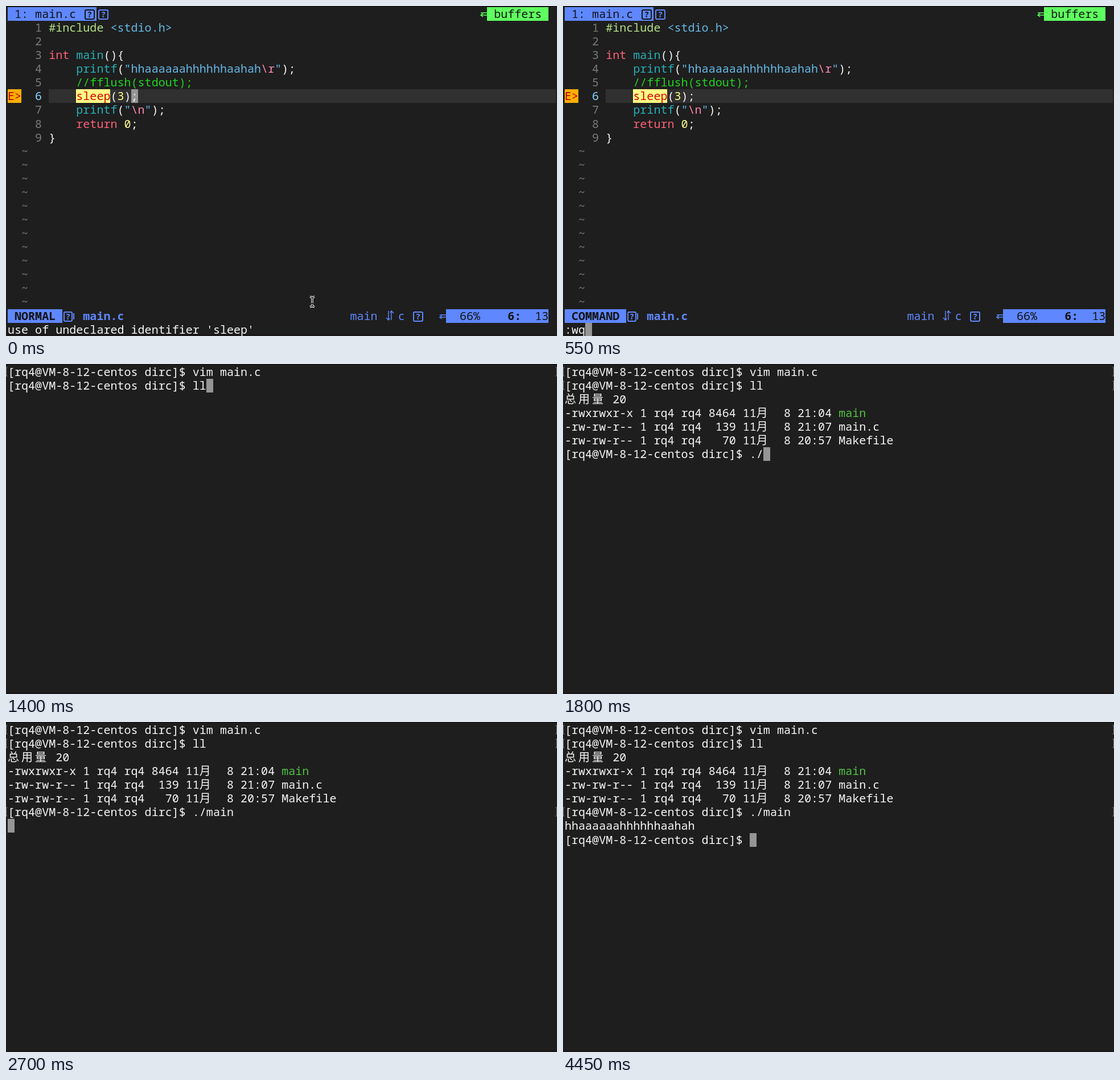
Write an HTML page with a canvas that moves like this. It is 968 px wide and 579 px high and loops after 4.5 s.

```html
<!DOCTYPE html>
<html lang="zh">
<head>
<meta charset="utf-8">
<title>Terminal session</title>
<style>
html, body { margin: 0; width: 100%; height: 100%; overflow: hidden; background: #1e1e1e; }
canvas { display: block; }
</style>
</head>
<body>
<canvas id="stage" width="968" height="579"></canvas>
<script>
const ctx = document.getElementById('stage').getContext('2d');
const LOOP = 4500, CELL = 12.03, ROW = 24.07, LEFT = 3, TOP = 2;
const FONT = '20.05px "Noto Sans Mono", "Noto Sans CJK SC", "Noto Sans CJK", monospace';
const C = {
  bg: '#1e1e1e', white: '#f6f6f6', blue: '#5f87ff', lime: '#5fff5f', ink: '#141414',
  grey: '#7a7a7a', cursor: '#959595', line: '#303030', red: '#ff6079', teal: '#27afb6',
  sky: '#65b9e6', pink: '#ff87af', comment: '#1fd41f', yellow: '#ffff87', include: '#b4e283',
  exec: '#53c245'
};
const PROMPT = '[rq4@VM-8-12-centos dirc]$ ';

const colX = col => LEFT + col * CELL;
const rowY = row => TOP + row * ROW;

function fill(x, y, w, h, color) {
  ctx.fillStyle = color;
  ctx.fillRect(x, y, w, h);
}

function block(col, row, cells, color) {
  const x = Math.round(colX(col)), y = Math.round(rowY(row));
  fill(x, y, Math.round(colX(col + cells)) - x, 24, color);
}

// Places characters on the terminal grid; CJK characters take two cells.
function put(col, row, text, color = C.white, weight = '') {
  ctx.font = weight + ' ' + FONT;
  ctx.fillStyle = color;
  for (const ch of text) {
    ctx.fillText(ch, colX(col), rowY(row) + 19);
    col += ch > '\u2fff' ? 2 : 1;
  }
  return col;
}

function putRuns(col, row, runs) {
  for (const [text, color] of runs) col = put(col, row, text, color);
}

function stroke(color, width, ...paths) {
  ctx.strokeStyle = color;
  ctx.lineWidth = width;
  ctx.beginPath();
  for (const [start, ...rest] of paths) {
    ctx.moveTo(...start);
    for (const p of rest) ctx.lineTo(...p);
  }
  ctx.stroke();
}

function missingGlyph(x, row, color, w = 17) {
  const y = Math.round(rowY(row)) + 5;
  ctx.strokeStyle = color;
  ctx.lineWidth = 2;
  ctx.beginPath();
  ctx.roundRect(x + 1, y, w - 1, 16, 2);
  ctx.stroke();
  ctx.font = 'bold 14px "Noto Sans Mono", monospace';
  ctx.fillStyle = color;
  ctx.fillText('?', x + (w + 1) / 2 - 4.2, y + 13);
}

function separator(col, row, color) {
  const x = colX(col), y = Math.round(rowY(row));
  stroke(color, 1.5,
    [[x + 1, y + 10], [x + 12, y + 10]],
    [[x + 12, y + 14], [x + 1, y + 14]],
    [[x + 5, y + 11], [x + 1, y + 14], [x + 5, y + 17]]);
}

function branchArrows(x, y) {
  stroke(C.blue, 1.5,
    [[x + 4, y], [x + 4, y + 16]], [[x, y + 12], [x + 4, y + 16], [x + 6, y + 13]],
    [[x + 9, y + 16], [x + 9, y]], [[x + 7, y + 3], [x + 9, y], [x + 13, y + 4]]);
}

function iBeam(x, y) {
  const shape = [
    [[x - 4, y - 9], [x - 1, y - 8], [x, y - 6], [x, y + 6], [x - 1, y + 8], [x - 4, y + 9]],
    [[x + 4, y - 9], [x + 1, y - 8], [x, y - 6]],
    [[x, y + 6], [x + 1, y + 8], [x + 4, y + 9]],
    [[x - 2, y + 3], [x + 2, y + 3]]
  ];
  stroke('#f4f4f4', 3.5, ...shape);
  stroke('#080808', 1.3, ...shape);
}

const CODE = [
  [['#include ', C.include], ['<stdio.h>', C.sky]],
  [],
  [['int ', C.red], ['main', C.teal], ['(){', C.white]],
  [['    printf', C.teal], ['(', C.white], ['"hhaaaaaahhhhhhaahah', C.sky], ['\\r', C.pink], ['"', C.sky], [');', C.white]],
  [['    //fflush(stdout);', C.comment]],
  [['    sleep', '#d70000'], ['(', C.white], ['3', C.yellow], [');', C.white]],
  [['    printf', C.teal], ['(', C.white], ['"', C.sky], ['\\n', C.pink], ['"', C.sky], [');', C.white]],
  [['    return ', C.red], ['0', C.yellow], [';', C.white]],
  [['}', C.white]]
];

function drawEditor(command) {
  block(0, 0, 13, C.blue);
  put(1, 0, '1: main.c', C.ink);
  missingGlyph(138, 0, C.ink);
  missingGlyph(162, 0, C.blue);
  separator(69, 0, C.lime);
  block(70, 0, 9, C.lime);
  put(71, 0, 'buffers', C.ink);

  fill(75, 146, 891, 24, C.line);
  block(0, 6, 2, '#ffaf00');
  put(0, 6, 'E>', '#b80000');
  block(10, 6, 5, C.yellow);
  if (command === null) block(18, 6, 1, C.cursor);
  CODE.forEach((runs, i) => {
    const current = i === 5;
    put(4, i + 1, String(i + 1), current ? '#87d7ff' : C.grey, current ? '500' : '');
    putRuns(6, i + 1, runs);
  });
  for (let row = 10; row < 22; row++) put(2, row, '~', C.grey);

  const mode = command === null ? 'NORMAL' : 'COMMAND';
  const end = mode.length + 2;
  block(0, 22, end, C.blue);
  put(1, 22, mode, C.ink, 'bold');
  missingGlyph(Math.round(colX(end)) + 2, 22, C.blue, 15);
  fill(Math.round(colX(end)) + 19, 539, 2, 11, C.blue);
  put(end + 3, 22, 'main.c', C.blue, 'bold');
  put(50, 22, 'main', C.blue);
  branchArrows(668, 535);
  put(57, 22, 'c', C.blue);
  missingGlyph(715, 22, C.blue);
  separator(63, 22, C.blue);
  block(64, 22, 15, C.blue);
  put(66, 22, '66%', C.ink);
  put(73, 22, '6:', C.ink, 'bold');
  put(77, 22, '13', C.ink);

  if (command === null) {
    put(0, 23, "use of undeclared identifier 'sleep'");
  } else {
    block(put(0, 23, command), 23, 1, C.cursor);
  }
}

// Brackets at both window edges mark a finished command line.
function promptLine(row, text, active) {
  const end = put(0, row, PROMPT + text);
  if (active) return block(end, row, 1, C.cursor);
  const y = Math.round(rowY(row)) + 4;
  stroke('#858585', 1, [[2.5, y], [0.5, y], [0.5, y + 15], [2.5, y + 15]],
    [[965.5, y], [967.5, y], [967.5, y + 15], [965.5, y + 15]]);
}

const typed = (text, times, t) => text.slice(0, times.filter(at => t >= at).length);

function drawShell(t) {
  const listed = t >= 1450, started = t >= 2650, done = t >= 3450;
  promptLine(0, 'vim main.c');
  promptLine(1, typed('ll', [1150, 1250], t), !listed);
  if (!listed) return;
  put(0, 2, '总用量 20');
  put(put(0, 3, '-rwxrwxr-x 1 rq4 rq4 8464 11月  8 21:04 '), 3, 'main', C.exec);
  put(0, 4, '-rw-rw-r-- 1 rq4 rq4  139 11月  8 21:07 main.c');
  put(0, 5, '-rw-rw-r-- 1 rq4 rq4   70 11月  8 20:57 Makefile');
  promptLine(6, typed('./main', [1750, 1800, 2350, 2400, 2450, 2500], t), !started);
  if (done) {
    put(0, 7, 'hhaaaaaahhhhhhaahah');
    promptLine(8, '', true);
  } else if (started) {
    block(0, 7, 1, C.cursor);
  }
}

function draw(t) {
  fill(0, 0, 968, 579, C.bg);
  fill(0, 0, 968, 1, '#0c0c0c');
  fill(0, 576, 968, 3, '#1b171a');
  if (t < 750) drawEditor(t < 200 ? null : typed(':wq', [200, 350, 500], t));
  else drawShell(t);
  if (t < 200) iBeam(538, 519);
  else if (t >= 4300 && t < 4450) iBeam(535, 514 + 6 * Math.floor((t - 4300) / 50));
}

const start = performance.now();
function tick() {
  draw((performance.now() - start) % LOOP);
  requestAnimationFrame(tick);
}
tick();
</script>
</body>
</html>
```
